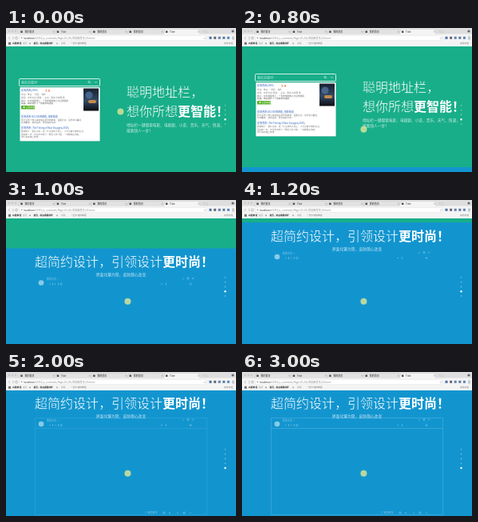
Recreate the animation shown at these times as an HTML page. Size 288 by 180 pixels, loop 4.8 s.

```html
<!DOCTYPE html>
<html lang="zh-CN">
<head>
<meta charset="utf-8">
<style>
html, body { margin: 0; width: 100%; height: 100%; overflow: hidden; background: #18ae89; }
svg { display: block; width: 288px; height: 180px; }
text { font-family: "Noto Sans CJK SC", "Noto Sans CJK", "Noto Sans", sans-serif; dominant-baseline: central; white-space: pre; }
</style>
</head>
<body>
<svg id="stage" viewBox="0 0 288 180"></svg>
<script>
const LOOP = 4800, TRAVEL = 158, GREEN = '#18ae89', BLUE = '#1295cf';

const text = (x, y, size, str, fill = '#fff', more = '') =>
  `<text x="${x}" y="${y}" font-size="${size}" fill="${fill}" ${more}>${str}</text>`;
const rect = (x, y, w, h, fill, more = '') =>
  `<rect x="${x}" y="${y}" width="${w}" height="${h}" fill="${fill}" ${more}/>`;
const dot = (x, y, r, fill, more = '') =>
  `<circle cx="${x}" cy="${y}" r="${r}" fill="${fill}" ${more}/>`;
const line = (d, color, width = 1, more = '') =>
  `<path d="${d}" fill="none" stroke="${color}" stroke-width="${width}" ${more}/>`;
const bold = s => `<tspan font-weight="900" stroke="none">${s}</tspan>`;
// a stroke in the page colour slims the letters
const headline = (x, y, str, page) =>
  text(x, y, 16, str, '#fff', `font-weight="300" stroke="${page}" stroke-width=".35"`);

function searchPanel() {
  const link = '#2a5db8', grey = '#777';
  return rect(16.5, 63.5, 101, 9, 'none', 'rx="1" stroke="#fff" stroke-opacity=".8"') +
    text(19, 68, 4, '我的关键词…', '#fff', 'opacity=".75"') +
    dot(104, 67.5, 1.2, 'none', 'stroke="#fff" stroke-width=".5"') +
    line('M105 68.5l1 1M111 67l1.5 1.5l1.5-1.5', '#fff', .5) +
    rect(17.3, 74, 100.4, 67.5, '#fff', 'rx=".8" stroke="#0d7d63" stroke-opacity=".3" stroke-width=".6"') +
    text(19, 77.5, 3, '星海漫游(2009)', link) +
    text(49, 77.5, 4, '7.9', '#e5632f', 'font-weight="700"') +
    text(19, 82.5, 2.7, '导演：林远 · 地区：海外', grey) +
    text(19, 86.5, 2.7, '类型：动作 科幻 冒险 · 主演：周岸 许青野 等', grey) +
    text(19, 90.5, 2.7, '简介：远方的星球上，一位年轻的旅人与当地居民', '#555') +
    text(19, 94, 2.7, '相遇，由此展开了一段奇妙的冒险……', '#555') +
    rect(19, 97, 17, 4.5, '#58b32c', 'rx=".5"') +
    text(21.5, 99.3, 2.8, '▶ 立即观看') +
    rect(97, 75.5, 19, 28, 'url(#poster)') +
    dot(104, 84, 4.5, '#46658c') + rect(103, 90, 10, 4, '#c58a46', 'rx="2"') +
    text(19, 110.7, 3, '星海漫游 2010 在线观看_电影频道', link) +
    text(19, 114.7, 2.7, '影片讲述了旅人来到遥远星球的故事，画面壮丽，深受观众喜爱，', grey) +
    text(19, 118, 2.7, '在线播放，高清画质，更多精彩内容……', grey) +
    text(19, 125.3, 3, '星海漫游 | The Telling of Star Voyages(2010)', link) +
    text(19, 129.4, 2.7, '剧情简介：很久以前，在一片辽阔的大陆上，人们过着平静的生活，', grey) +
    text(19, 132.9, 2.7, '直到有一天，天空中出现了一艘巨大的飞船，一切都随之改变，', grey) +
    text(19, 136.4, 2.7, '他们决定踏上旅途……', grey);
}

function greenPage() {
  return searchPanel() +
    headline(151, 79, '聪明地址栏，', GREEN) +
    headline(151, 103, '想你所想' + bold('更智能！'), GREEN) +
    text(151, 121, 4.7, '地址栏一键搜索电影、电视剧、小说、音乐、天气、快递，', '#fff', 'opacity=".8"') +
    text(151, 128, 4.7, '搜索快人一步！', '#fff', 'opacity=".8"');
}

function bluePage() {
  return rect(0, 22, 288, 160, BLUE) +
    headline(36, 37.5, '超简约设计，引领设计' + bold('更时尚！'), BLUE) +
    text(144, 54.2, 4.8, '界面化繁为简，皮肤随心改变', '#fff', 'text-anchor="middle" opacity=".75"') +
    line('M36.5 57.5H251.5V178.5H36.5ZM36.5 70.5H251.5', '#fff', 1, 'id="outline"') +
    `<g opacity=".5">` +
    dot(44, 65, 3.3, '#fff') +
    text(51, 60.5, 3, '我的主页  +') +
    line('M55.5 65.5l-1 1l1 1M58.5 65v3M61 65.5l1 1l-1 1M65.5 65v3M194 66l1 1l1-1M200.5 65v3M231.5 65v3', '#fff', .6) +
    dot(69, 66.5, 1.2, 'none', 'stroke="#fff" stroke-width=".5"') +
    line('M221 60h2M227 58.5h2v2h-2zM233 58.5l2 2m0-2l-2 2M229 66l1 1l1-1', '#fff', .5) +
    text(174, 175.7, 3, '⊙ 网页医生') +
    line('M197 175h2v2h-2zM205 175v2m-1-1l1 1l1-1M214 176h2M222 175h2v2h-2zM230 175l2 2', '#fff', .5) +
    `</g>`;
}

function browser() {
  const tabs = ['我的首页', 'Title', '我的首页', '我的首页', 'Title'];
  let s = rect(0, 0, 288, 8, '#dedede') + rect(0, 7.5, 288, 15.5, '#f4f4f4') +
    [4, 8, 12].map(x => dot(x, 3.7, 1.2, '#c8c8c8')).join('');
  tabs.forEach((name, i) => {
    const x = 15.5 + i * 45.4;
    s += line(`M${x} 8l2-6.5h42l2 6.5`, '#c4c4c4', .4, `style="fill:${i == 4 ? '#f4f4f4' : '#e2e2e2'}"`) +
      rect(x + 2.8, 3.5, 2.5, 2.5, '#555') + text(x + 8, 4.5, 3, name, '#222') +
      line(`M${x + 43} 4l1.5 1.5m0-1.5l-1.5 1.5`, '#888', .4);
  });
  s += line('M247 3.5h5l1 2.5h-5z', '#bbb', .4) + dot(284, 4, 1.6, '#667') +
    line('M5 11l-2 1.5l2 1.5M8 11l2 1.5l-2 1.5', '#aaa', .6) +
    dot(13, 12.5, 1.4, 'none', 'stroke="#999" stroke-width=".6"') +
    rect(17, 9.5, 234, 6, '#fff', 'rx="1" stroke="#ddd" stroke-width=".4"') +
    dot(19.5, 12.3, .9, '#999') +
    text(22, 12.2, 3.2, '<tspan fill="#222">localhost</tspan>:63342/z_codeweb/Page/01/06/浏览器首页/03.html', '#888') +
    text(247.5, 12.3, 3.2, '☆', '#777');
  ['#4671a8', '#667', '#5a7fb8', '#6a7890', '#4f87c8'].forEach((c, i) => s += rect(254.5 + i * 5.6, 10.8, 3, 3, c));
  s += line('M283 11h3m-3 1.5h3m-3 1.5h3', '#777', .5) +
    rect(3, 17.8, 3, 3, '#777') + dot(30, 19.3, 1, '#999') + dot(64, 19.3, 1, '#aaa') +
    text(8, 19.2, 2.8, '山居茶话', '#222', 'font-weight="700"') +
    text(21, 19.2, 2.8, '首页', '#888') +
    text(34.5, 19.2, 2.7, '首页，就去看看就好', '#222', 'font-weight="700"') +
    text(69, 19.2, 2.8, '视频', '#888') +
    text(81, 19.2, 2.8, '一些不错的教程', '#777') +
    text(273, 19.2, 2.8, '其他书签', '#777');
  return s;
}

const $ = id => document.getElementById(id);
$('stage').innerHTML =
  `<defs><linearGradient id="poster" x2="0" y2="1"><stop stop-color="#17202f"/>
   <stop offset=".55" stop-color="#344b66"/><stop offset="1" stop-color="#0c0d12"/></linearGradient></defs>` +
  rect(0, 0, 288, 180, GREEN) +
  `<g id="green">${greenPage()}</g><g id="blue">${bluePage()}</g><g id="nav"></g>` +
  dot(0, 0, 4, '#dce596', 'id="cursor" fill-opacity=".82"') +
  browser();

// distance left to scroll, from 800 ms on, one entry per 100 ms
const remaining = [152, 73, 38.5, 17, 6, 1.5, 0];
const cursorPath = [[143.4, 104.6], [121.5, 136.5], [152.4, 126.7]];

function draw(now) {
  const step = Math.floor(now % LOOP / 100);
  const left = step < 8 ? TRAVEL : remaining[Math.min(step - 8, 6)];
  const current = step < 14 ? 3 : 4;
  $('green').setAttribute('transform', `translate(0 ${left - TRAVEL})`);
  $('blue').setAttribute('transform', `translate(0 ${left})`);
  $('outline').setAttribute('opacity', step < 14 ? 0 : step < 25 ? .08 : .15);
  $('nav').innerHTML = [0, 1, 2, 3, 4].map(i =>
    dot(274.5, 96.8 + i * 5.8, i == current ? 1.2 : .8, '#fff', `opacity="${i == current ? 1 : .45}"`)).join('');
  $('cursor').setAttribute('transform', `translate(${cursorPath[Math.min(step, 2)]})`);
}

const start = performance.now();
function tick() {
  draw(performance.now() - start);
  requestAnimationFrame(tick);
}
tick();
</script>
</body>
</html>
```
